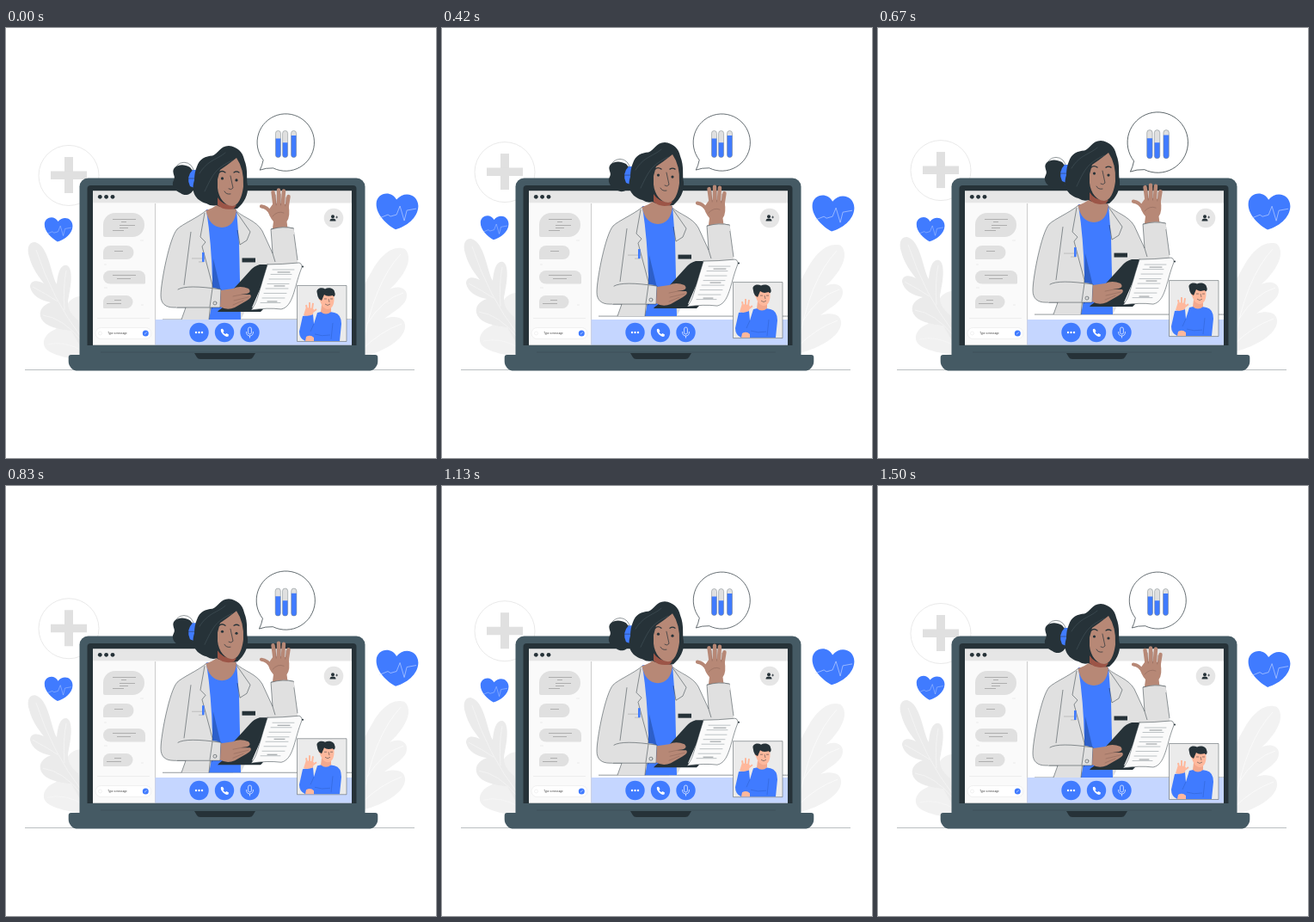
An HTML page with a canvas that plays this animation: 500x500 px, repeating every 1540 ms.

```html
<!DOCTYPE html>
<html lang="en">
<head>
<meta charset="utf-8">
<title>Online doctor</title>
<style>
html, body { margin: 0; width: 100%; height: 100%; overflow: hidden; background: #fff; }
canvas { display: block; width: 500px; height: 500px; }
</style>
</head>
<body>
<canvas id="stage"></canvas>
<script>
const LOOP = 1540, LEAD = 40;
const BLUE = '#407bff', DARK = '#263238', STEEL = '#455a64', GREY = '#e0e0e0';
const SKIN = '#b78876', PEACH = '#ffb89c', SHADE = '#2d5fc9';
const canvas = document.getElementById('stage');
const ctx = canvas.getContext('2d');
const ratio = window.devicePixelRatio || 1;
canvas.width = canvas.height = 500 * ratio;

function paint(shape, fill, stroke, width = 0.5) {
  const path = typeof shape === 'string' ? new Path2D(shape) : shape;
  if (fill) { ctx.fillStyle = fill; ctx.fill(path); }
  if (stroke) { ctx.strokeStyle = stroke; ctx.lineWidth = width; ctx.stroke(path); }
}
const line = (d, color = DARK, width = 0.5) => paint(d, null, color, width);
function box(x, y, w, h, r, fill, stroke, width) {
  const p = new Path2D();
  p.roundRect(x, y, w, h, r);
  paint(p, fill, stroke, width);
}
function disc(x, y, r, fill, stroke, width) {
  const p = new Path2D();
  p.arc(x, y, r, 0, Math.PI * 2);
  paint(p, fill, stroke, width);
}
function placed(x, y, scale, draw) {
  ctx.save();
  ctx.translate(x, y);
  ctx.scale(scale, scale);
  draw();
  ctx.restore();
}

function cross() {
  disc(73, 171.5, 35, '#fff', '#e4e4e4', 0.8);
  box(68, 150, 10, 42, 0, GREY);
  box(52, 166.5, 42, 9.5, 0, GREY);
}

function leaves() {
  paint('M96 312C84 310 75 314 71 322L58 350C48 354 43 361 44 368C46 379 66 383 96 388Z', '#f1f1f1');
  paint('M34 249C26 248 24 257 27 266C30 278 37 288 44 297C35 292 28 294 28 301C30 311 40 317 52 319C43 322 37 329 41 338C47 348 60 350 76 352L92 380L84 340C74 332 70 324 73 312C76 298 78 280 71 276C63 274 60 286 59 298C52 286 50 254 34 249Z', '#ebebeb');
  line('M35 258Q54 316 88 360M31 301Q48 310 60 318M70 282Q66 302 68 328M43 334Q66 337 88 364M48 368Q68 363 90 376', '#f8f8f8', 0.6);
  paint('M460 256C446 254 434 268 427 280Q420 292 416 300V382C440 376 463 362 464 348C465 336 452 334 440 338C453 328 466 322 466 311C466 300 452 300 446 304C457 294 469 279 468 266C467 259 464 256 460 256Z', '#f2f2f2');
  line('M459 263Q427 297 414 374M462 308Q438 315 420 344M460 344Q435 353 414 374', '#fff', 0.6);
}

function laptop() {
  line('M22 397.5H475', '#8b9498', 0.6);
  box(85.5, 174.5, 332, 210, [10, 10, 0, 0], STEEL);
  box(94.5, 183, 313, 186, [4, 4, 0, 0], DARK);
  box(101, 189.5, 301, 179, 0, '#fff');
  box(101, 189.5, 301, 14, 0, '#e6e6e6');
  for (const x of [109.3, 116.6, 124]) disc(x, 196.3, 2.4, DARK);
  box(72.7, 380, 359.6, 18.6, [3, 3, 11, 11], STEEL);
  line('M110 377H388', '#3b4e57', 0.8);
  paint('M219 378H290L287 383Q286 385 283 385H226Q223 385 222 383Z', DARK);
}

function chat() {
  box(101, 203.5, 72.5, 165, 0, '#fafafa');
  line('M173.5 204V368.5', '#b8b8b8', 0.7);
  line('M106 337.5H167', '#e4e4e4', 0.6);
  box(113, 215, 48, 28, [14, 14, 14, 2], GREY);
  box(113, 253, 35.5, 16, [8, 8, 8, 1], GREY);
  box(113, 282, 49, 15.5, [8, 8, 1, 8], GREY);
  box(113, 311, 34.5, 15, [8, 8, 8, 1], GREY);
  line('M124 222.5H151M134 225.5H140M132 229.5H150M124 235.5H137M132 232.5H142M126 259.5H136M124 287.5H151M129 291.5H145M126 316.5H134M117 320.5H134', '#7b7b7b', 0.5);
  line('M156 247H160M114 275H117M114 302H118M157 322H160', '#dcdcdc', 0.5);
  box(104, 348.5, 65, 13, 6.5, '#fff', '#e2e2e2', 0.5);
  ctx.fillStyle = '#444';
  ctx.font = '3.1px Roboto, sans-serif';
  ctx.fillText('Type a message', 118.3, 356);
  disc(109.5, 355, 2, null, '#e4e4e4', 0.5);
  disc(162.3, 355, 3.5, BLUE);
  line('M161 356.2L163.8 353.7', '#fff', 0.6);
}

function contact() {
  disc(381, 221, 11.3, '#e6e6e6');
  disc(380, 219.2, 2, DARK);
  paint('M376.5 224.5Q376.5 221.5 380 221.5T383.5 224.5Z', DARK);
  line('M383.2 220H386M384.6 218.6V221.4', DARK, 0.7);
}

function coat() {
  paint('M267 213C277 221 291 224 298 236L310 262L308 234Q322 229 334 233L339 270Q340 287 326 290L296 294L273 339H264Z', GREY);
  line('M268 213C277 221 291 224 298 236L310 262L308 234Q322 230 334 233L339 270M310 262L313 272');
  paint('M233 211H268L271 250L273 339H235L240 292L229 246Z', BLUE);
  paint('M241 268L250 306L243 322L237 330L240 292Z', SHADE);
  paint('M233 212C224 220 205 228 199 234C190 244 180 296 180 311C180 321 186 325 195 325H209L204 339H236Q241 318 240 296Q239 250 233 212Z', GREY);
  line('M233 212C224 220 205 228 199 234C190 244 180 296 180 311C180 321 186 325 195 325H209L204 339M207 299L215 237M231 215L226 243L232 249L228 254L240 299L236 339M269 235L272 252L280 247L284 237L268 214');
  line('M216 268H232M224 272H230', '#8a8a8a', 0.4);
  line('M229.3 261V272', BLUE, 2.6);
  box(274.5, 267.5, 15.5, 5, 0, DARK);
}

function raisedHand() {
  ctx.lineCap = 'round';
  line('M313 210L310.5 191M317 209L317 188.5M321.5 209L323 189.5M326 212L328.5 196', SKIN, 4.4);
  line('M297 207.5Q304 208 309 217', SKIN, 4.2);
  paint('M310 205Q319 202 328.5 206Q331 219 326.5 225L327.5 233Q319 235 310 233L311 225Q305 218 305 212Z', SKIN);
  line('M314.2 206L313.5 194M319.5 206V193M324.8 207L325.5 197M310 219Q316 212 323 215', '#7b594e', 0.4);
  paint('M308.5 234Q322 229 334.5 233L335.5 240L310 241Z', GREY);
  line('M308.5 234Q322 230 334.5 233');
}

function head() {
  disc(207, 167.5, 11.2, null, DARK, 0.5);
  // Neck and scooped neckline.
  paint('M245 190L246 205Q240 210 232.5 212Q236 231 251 232Q266 231 268 212L263 203Z', SKIN);
  paint('M214 162C204 156 193 161 194.5 168C195 172 197 173 195 177C191 184 198 190 203 192C208 196 215 194 218 188L224 174Z', DARK);
  paint('M217 165Q209 173 214 184L219 186L221 165Z', BLUE);
  line('M211 175H219');
  paint('M222 161C225 152 232 149 240 148.5C246 147 249 137 259 137C269 138 275 144 277 153C282 165 279 175 281 183C282 194 277 203 269 210C258 211 248 208 245 206Q239 208 233 204C219 200 215 189 219 177Q219 168 222 161Z', DARK);
  paint('M246 197Q253 208 268 206L265 210Q254 213 246 206Z', '#9c5547');
  paint('M268 151Q258 159 249 165L246 176L246 186C247 198 255 207 263 207C271 207 275 194 276 184Q277 164 268 151Z', SKIN);
  line('M248 168Q251 165 255 168M265 168Q268 166 271 168', DARK, 1.3);
  disc(251.5, 175, 1.6, DARK);
  disc(268, 177, 1.6, DARK);
  line('M261 172L264 186Q262 189 259 187M254 190Q256 194 261 193', DARK, 0.7);
  line('M225 169C235 153 246 153 255 145M231 190C241 169 244 163 263 154', '#55666e', 0.4);
}

function notes() {
  paint('M303 275H295Q288 277 284 282L264 304L260 321Q250 325 246 330H296L299 327L286 325L306 279Z', DARK);
  paint('M304 275Q320 275 341 273Q346 275 343 281C335 302 334 324 320 327Q304 325 285 328C291 320 292 315 295 305Q299 291 304 275Z', '#fafafa', DARK);
  line('M310 281H335M308 286.5H332M306 292H331M304 297.5H329M302 303H328M300 308.5H326M298 314H324M296 319.5H319', '#7f898e');
  line('M316 284H330M312 300H324M304 318H315');
  disc(345, 277.5, 1, DARK);
  paint('M207 300Q230 299 250 304L249 325H198L194 310Z', GREY);
  line('M200 304Q210 298 250 304L249 325H199M240 303L237 324');
  disc(243, 320, 2, null, DARK);
  paint('M250 305L264 303Q272 299 282 303Q286 307 280 309L273 310L284 310Q287 313 280 317L266 325Q257 329 249 324Z', SKIN);
  line('M264 312L279 309M265 317L282 313M264 322L276 317', '#7b594e', 0.4);
}

function doctor() {
  line('M182 339H402');
  coat();
  raisedHand();
  head();
  notes();
}

function callBar() {
  box(173.5, 339, 228.5, 29.5, 0, '#c5d6ff');
  for (const x of [224.5, 254, 283.5]) disc(x, 354, 11.2, BLUE);
  for (const x of [221, 224.5, 228]) disc(x, 354, 1.2, '#fff');
  paint('M250 350L252 349.8L253.5 352.5L252.5 353.8Q253.5 355.5 255.2 356L256.4 355L259 356.5L258.5 358.5Q256 360 252.5 356.5Q249 353 250 350Z', '#fff');
  box(281.6, 348, 3.8, 8, 1.9, null, '#fff', 0.7);
  line('M279.5 353Q279.5 358 283.5 358T287.5 353M283.5 358V360.5', '#fff', 0.7);
}

function caller() {
  box(338.5, 299.5, 57.5, 65, 0, '#ebebeb', '#60696d', 0.6);
  paint('M362 331Q371 328 382 331Q390 333 390 344L388 364H348Q341 361 341 353L345 335L357 333L358 344Z', BLUE);
  line('M358 344L354 353M380 343L378 362M359 356Q367 359 377 357', SHADE);
  paint('M367 322L366 330Q372 335 378 330V322Z', '#f3a88d');
  paint('M367 309Q375 305 381 310C383 321 379 327 374 327C368 326 366 320 365 317Q362 314 366 313Z', PEACH);
  paint('M361.5 307C361 303 367 301 371 303.5C375 301 382 303 382 307C384 311 381 314 380 311Q373 313 370 310L367 317L364 315Q362 312 361.5 307Z', DARK);
  line('M370 315H373M377 315H380M375 315L376 319M371 321Q374 324 377 321');
  line('M350 327L349 322M353 327V319M356 327L357 320M357 330L361 327', PEACH, 2);
  paint('M348.5 326Q353 324 358 327L357 333Q351 336 346 334Z', PEACH);
  paint('M349 359Q354 356 358 360V364H348Z', PEACH);
}

function heart() {
  paint('M-2 21.3C-12 16 -25 4 -24.5 -9C-24 -22 -7 -25 -1 -13.5C8 -24.5 24 -20 24.3 -6C24 8 10 18 -2 21.3Z', BLUE);
  line('M-21 8L-11 4L-8 6L-1 4L3 -6L8 11L11 -1L22 -3', '#d0deff', 0.6);
}

function tube(x, level) {
  box(x, 119.5, 6, 31, 3, GREY);
  box(x, level, 6, 150.5 - level, [0, 0, 3, 3], BLUE);
  box(x, 119.5, 6, 31, 3, null, '#7a8489', 0.5);
}

function speech() {
  paint('M299.3 153.4A33 33 0 1 1 310.8 162.7Q302 162.4 295.4 165Q298 160 299.3 153.4Z', '#fff', DARK, 0.7);
  tube(313.5, 128.5);
  tube(321.6, 133.3);
  tube(331.5, 125);
}

// Two beats followed by a rest.
function beat(p) {
  const stops = [[0, 0], [0.14, 1], [0.28, 0], [0.42, 1], [0.7, 0], [1, 0]];
  const i = stops.findIndex(([at]) => p < at);
  const [a, from] = stops[i - 1], [b, to] = stops[i];
  const ease = (1 - Math.cos(Math.PI * (p - a) / (b - a))) / 2;
  return from + (to - from) * ease;
}

function draw(now) {
  const phase = ((now + LEAD) % LOOP) / LOOP;
  const angle = phase * Math.PI * 2;
  const lift = -3 * (1 - Math.cos(angle));
  const bob = 2.7 * Math.sin(angle);
  const size = 1 + 0.07 * beat(phase);

  ctx.setTransform(ratio, 0, 0, ratio, 0, 0);
  ctx.fillStyle = '#fff';
  ctx.fillRect(0, 0, 500, 500);
  ctx.lineJoin = 'round';
  ctx.lineCap = 'butt';
  placed(0, lift, 1, () => { cross(); leaves(); });
  laptop();
  chat();
  contact();
  placed(0, lift, 1, doctor);
  callBar();
  placed(0, lift, 1, caller);
  placed(455.1, 212.6 + bob, 1, heart);
  placed(61.2, 234.6 - bob, 0.67, heart);
  placed(325.4 * (1 - size), 133 * (1 - size), size, speech);
}

const start = performance.now();
function tick() {
  draw(performance.now() - start);
  requestAnimationFrame(tick);
}
tick();
</script>
</body>
</html>
```
